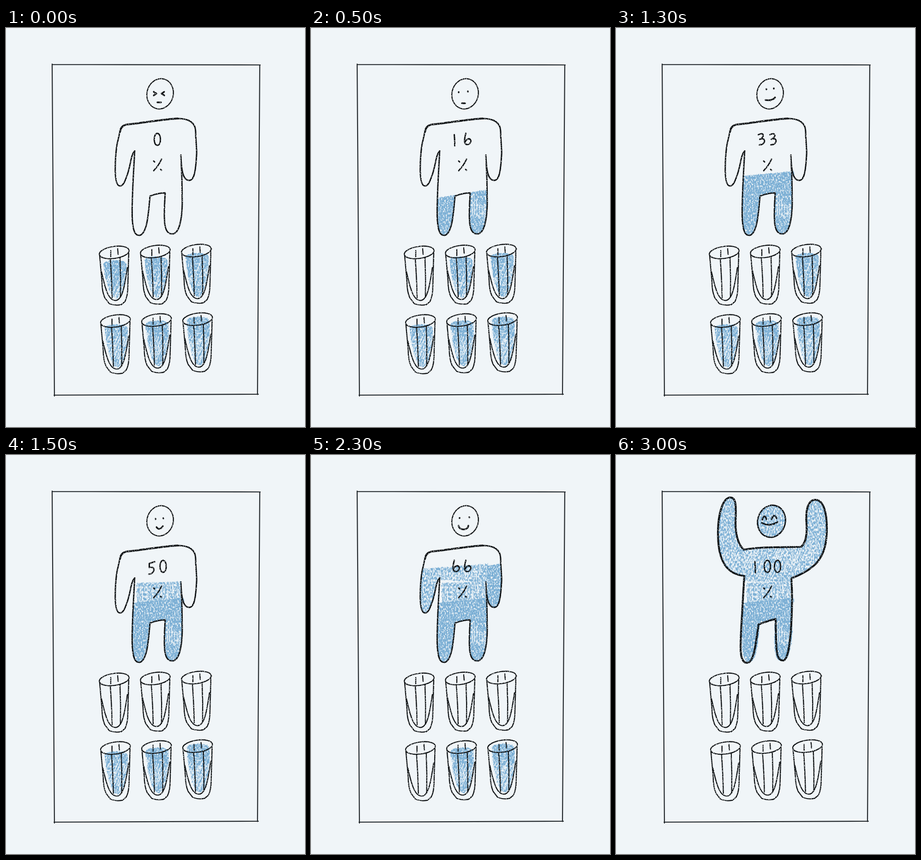
These frames come from a looping animation (648 px wide and 864 px high, 3500 ms). An HTML page:

```html
<!DOCTYPE html>
<html lang="en">
<head>
<meta charset="utf-8">
<title>Six glasses</title>
<style>
@property --step { syntax: "<integer>"; inherits: true; initial-value: 0; }
@keyframes tick { from { --step: 0; } to { --step: 7; } }
html, body { margin: 0; width: 100%; height: 100%; overflow: hidden; background: #f0f5f8; }
svg {
  display: block; width: 100vw; height: 100vh;
  animation: tick 3500ms steps(7, end) infinite;
}
/* visible from step --k up to, not including, step --e */
.t { opacity: min(var(--step) - var(--k, 0) + 1, var(--e, 7) - var(--step)); }
.ink, .card { fill: none; stroke: #101315; stroke-width: 3; stroke-linecap: round; stroke-linejoin: round; }
.card { stroke: #23282c; stroke-width: 2.2; }
.wax { fill: #7aaed4; }
.gap { fill: none; stroke: #f0f5f8; stroke-width: 1.5; stroke-linecap: round; }
.thin { stroke-width: 2.4; }
.bold { stroke-width: 4.2; }
.face { stroke-width: 3.5; }
</style>
</head>
<body>
<svg viewBox="0 0 648 864">
  <defs>
    <path id="body" d="M247 224Q249 211 262 209C300 205 345 197 372 196Q411 196 411 225C411 245 414 260 413 275C411 310 408 330 397 330C384 330 380 310 379 275C381 310 382 340 382 380C381 420 374 446 360 446C342 446 341 420 345 357Q330 357 312 364C309 400 306 449 288 449C270 449 272 400 276 320L279 266C270 275 270 300 262 320C257 335 253 342 247 342C232 342 237 280 240 255Z"/>
    <path id="cheer" d="M278 262C240 258 221 230 221 170C221 125 232 92 248 92C262 92 260 115 259 150C260 180 267 196 277 205Q300 201 330 200L401 199C412 190 414 170 413 150C410 120 416 97 432 97C450 97 457 125 457 160C457 225 430 248 380 267C383 310 381 350 379 380C376 415 372 445 362 445C346 445 347 420 346 355Q326 360 309 367C303 405 300 450 284 450C264 450 270 405 274 330Z"/>
    <ellipse id="head" cx="334" cy="142.500" rx="28.500" ry="33" transform="rotate(15 334 142.500)"/>
    <ellipse id="happy" cx="337" cy="143.500" rx="30" ry="35" transform="rotate(15 337 143.500)"/>
    <clipPath id="inBody"><use href="#body"/></clipPath>
    <clipPath id="inCheer"><use href="#cheer"/></clipPath>
    <g id="glass" class="thin">
      <ellipse cx="234.500" cy="486" rx="32.500" ry="13" transform="rotate(-8 234.500 486)"/>
      <path d="M203 493L208 550Q208 570 214 584L224 597Q237 602 250 599L258 592Q264 580 264 560L266 488"/>
      <path d="M207 528C215 565 222 590 237 590S257 560 263 519"/>
      <path d="M226 500Q229 540 230 584M247 498Q249 540 248 583M227 482V495M242 478L243 490"/>
    </g>
  </defs>

  <path class="card" d="M100 79L551 80M100 78Q101 420 105 797M104 795L547 793M550 80Q548 420 545 794"/>

  <g filter="url(#dense)">
    <g id="water"></g>
    <g clip-path="url(#inBody)">
      <g class="t" style="--k:1">
        <path class="wax" d="M268 369L386 349V452H268Z"/>
        <path class="gap" data-hatch="350 362 30 62 0 5"/>
      </g>
      <path class="wax t" style="--k:2" d="M268 321L386 310V352L268 371Z"/>
      <path class="wax t" style="--k:4;--e:6" d="M382 240L416 234V334H382Z"/>
    </g>
  </g>

  <g filter="url(#loose)">
    <g clip-path="url(#inBody)">
      <g class="t" style="--k:3">
        <path class="wax" d="M283 277L379 274V313L283 322Z"/>
        <path class="gap" data-hatch="286 284 88 34 0 9"/>
      </g>
      <g class="t" style="--k:4;--e:6">
        <path class="wax" d="M235 247L384 235V276L280 270L262 342H235Z"/>
        <path class="gap" data-hatch="276 250 92 26 0 6"/>
      </g>
      <g class="t" style="--k:5;--e:6">
        <path class="wax" d="M240 195H416V236L240 246Z"/>
        <path class="gap" data-hatch="246 208 160 46 .15 7"/>
      </g>
    </g>
    <g class="t" style="--k:6">
      <g clip-path="url(#inCheer)">
        <path class="wax" d="M215 85H465V262L380 274H278L215 262Z"/>
        <path class="gap" data-hatch="232 196 190 76 .5 8"/>
      </g>
      <use href="#happy" class="wax"/>
    </g>
  </g>

  <g class="ink" filter="url(#pencil)">
    <g id="rims"></g>
    <g class="t" style="--e:6">
      <use href="#body"/>
      <use href="#head" class="thin"/>
      <path class="bold" d="M247 225Q249 211 262 209C300 205 345 197 372 196"/>
    </g>
    <g class="t" style="--k:6">
      <use href="#cheer" class="bold"/>
      <use href="#happy"/>
    </g>
    <path d="M337 284Q331 298 320 309M320 288L322 290M335 306L337 308"/>
    <g id="moods"></g>
  </g>
</svg>
<script>
const $ = s => document.querySelector(s);
let seed = 7;
const rnd = () => (seed = seed * 16807 % 2147483647) / 2147483647;

// Displaces edges, then rubs grain out: alpha = gain * noise - cut
const grain = (id, freq, shift, gain, cut) => `
  <filter id="${id}" filterUnits="userSpaceOnUse" x="0" y="0" width="648" height="864" color-interpolation-filters="sRGB">
    <feTurbulence type="fractalNoise" baseFrequency="${freq}" numOctaves="3" seed="9" result="n"/>
    <feDisplacementMap in="SourceGraphic" in2="n" scale="${shift}" xChannelSelector="R" yChannelSelector="G" result="d"/>
    <feColorMatrix in="n" values="0 0 0 0 0  0 0 0 0 0  0 0 0 0 0  0 0 ${gain} 0 ${-cut}"/>
    <feComposite in="d" operator="in"/>
  </filter>`;

// Loose strokes leaning left as they go down
function hatch(x, y, w, h, lean, gap) {
  let d = "";
  for (let px = x; px < x + w + lean * h; px += gap * (.5 + rnd())) {
    const top = h * rnd() * .45, len = h * (.3 + rnd() * .4);
    d += `M${px - lean * top} ${y + top}l${-lean * len} ${len}`;
  }
  return d;
}

const digits = {
  0: "M0-13C-9-12-9 13 0 13S9-12 0-13Z",
  1: "M-5-10Q-4 0-4 14",
  3: "M-7-10Q3-15 4-8Q2-3-4 0Q8-4 6 6Q3 12-5 12",
  5: "M7-10L-5-6V3Q6 0 5 9Q2 17-6 17",
  6: "M-5-13Q-9 2-7 8C-3 15 6 10 6 3C4-3-3-3-7 7",
  8: "M5-14C-2-19-7-11-1-5S6 12 0 13S-5 3 0-1S8-12 5-14"
};

const dots = (x, y, gap) => `M${x} ${y}v1M${x + gap} ${y - 1.5}v1`;
const faces = [
  "M320 138L326 142L320 146M343 138L337 142L343 146M328 161H336",
  dots(320, 138.5, 20) + "M327 163H334",
  dots(326, 132, 16) + "M324 156Q340 158 345 150",
  dots(324, 138, 17) + "M326 156Q332 165 340 154",
  dots(322, 136, 21) + "M320 153C321 164 340 164 341 153",
  dots(322, 134, 20) + "M321 150L342 147Q340 162 332 162Q322 163 321 150Z",
  "M317 140Q322 126 326 139M337 139Q343 125 348 137M316 147Q334 156 350 145"
];

$("defs").insertAdjacentHTML("beforeend",
  grain("pencil", ".5", 1.6, 6, 1.55) +
  grain("dense", ".4 .22", 4, 4, 1.1) +
  grain("loose", ".4 .2", 5, 4, 1.4));

document.querySelectorAll("[data-hatch]").forEach(el =>
  el.setAttribute("d", hatch(...el.dataset.hatch.split(" ").map(Number))));

let water = "", rims = "", moods = "";
for (let i = 0; i < 6; i++) {
  const col = i % 3, row = i / 3 | 0, level = 502 - 6 * col - 10 * row;
  const at = `transform="translate(${89 * col + 2.7 * row} ${148.5 * row - 2 * col})"`;
  const shape = `M211 ${level + 9}C213 ${level - 2} 259 ${level - 2} 261 ${level + 9}C262 545 252 586 239 586S214 545 211 ${level + 9}Z`;
  water += `<clipPath id="w${i}"><path d="${shape}"/></clipPath>
    <g ${at}><g class="t" style="--e:${i + 1}" clip-path="url(#w${i})"><path class="wax" d="${shape}"/>
    <path class="gap" d="${hatch(212, level + 18, 48, 90, .45, 5)}"/></g></g>`;
  rims += `<use href="#glass" ${at}/>`;
}
faces.forEach((face, i) => {
  const label = [...String(Math.floor(100 * i / 6))], n = label.length;
  const text = label.map((c, j) =>
    `<path d="${digits[c]}" transform="translate(${328 + (j - (n - 1) / 2) * (31 - 3 * n)} 241)"/>`).join("");
  moods += `<g class="t" style="--k:${i};--e:${i + 1}">${text}<path class="face" d="${face}"/></g>`;
});
$("#water").innerHTML = water;
$("#rims").innerHTML = rims;
$("#moods").innerHTML = moods;
</script>
</body>
</html>
```
